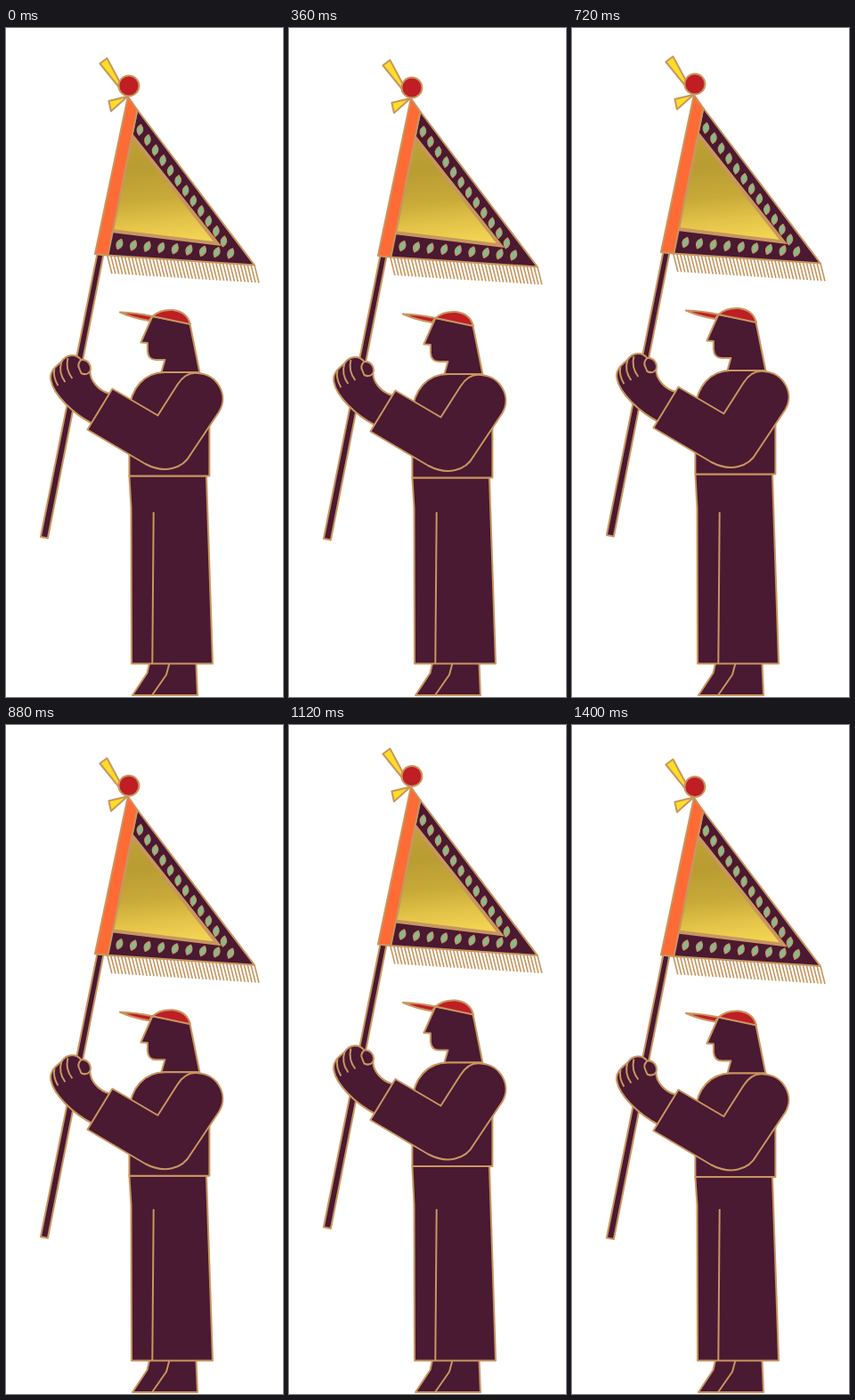
Write an HTML page that moves like this. It is 311 by 752 pixels and loops after 1440 ms.

```html
<!DOCTYPE html>
<html lang="en">
<head>
<meta charset="utf-8">
<title>Flag bearer</title>
<style>
  html, body { margin: 0; width: 100%; height: 100%; overflow: hidden; background: #fff; }
  svg { display: block; }
  .line { fill: none; }
  .leaf { fill: #80bd94; stroke-width: 1.3; }
</style>
</head>
<body>
<svg width="311" height="752" viewBox="0 0 311 752" fill="#4a1932" stroke="#c8965f" stroke-width="2" stroke-linejoin="round">
  <defs>
    <linearGradient id="gold" x1="0.2" y1="0" x2="0.3" y2="1">
      <stop offset="0" stop-color="#bfa236"/>
      <stop offset=".3" stop-color="#b99c32"/>
      <stop offset=".6" stop-color="#c8aa39"/>
      <stop offset=".82" stop-color="#e3c348"/>
      <stop offset="1" stop-color="#f2d453"/>
    </linearGradient>
    <path id="leaf" d="M0-6Q6.500 0 0 6Q-6.500 0 0-6Z"/>
  </defs>

  <path d="M161 714L158.500 725L142 750H215L213.500 714Z"/>
  <path class="line" d="M183.500 714L180 727L164 750"/>
  <path id="trousers"/>
  <path class="line" d="M165.700 545L164.300 714" stroke-linecap="round"/>

  <g id="upper">
    <path d="M102 254L109 255L46.500 573.500L38.500 572Z"/>

    <path d="M147 92L278.500 266.500L113 255.500Z"/>
    <path d="M141 121L237 242.500L118.500 228Z" fill="url(#gold)" stroke-width="4" stroke-linejoin="miter"/>
    <g id="leaves"></g>
    <path id="fringe" class="line" stroke-width="1.6"/>
    <path d="M136.500 77L147 92L114 255.500L99.500 254Z" fill="#ff6b35"/>

    <g fill="#ffde26">
      <path d="M105 40L113 34L128 62L126 66Z"/>
      <path d="M136 77L115 82L117.500 93.500Z"/>
    </g>
    <circle cx="137.500" cy="65" r="11.500" fill="#bf1e24"/>

    <path d="M164 324L151 353.500L158.500 354V363Q159 373 168 373H178L174 387H217L206 332Z"/>
    <g fill="#bf1e24">
      <path d="M127.500 319.500Q146 320 164 324L160 329Q142 326 127.500 319.500Z"/>
      <path d="M164 324Q173 316 187 317Q203 319 206.500 333Z"/>
    </g>

    <path d="M138 503.500V431C139 405 155 387 178 387H215L228 400V503.500Z"/>
    <path d="M97 445C74 433 53 412 50 396C48 386 55 381 62 375C67 367 78 365 84 373C92 372 96 380 94 386C94 397 104 408 116 411L112 442Z"/>
    <path class="line" d="M54 383Q52 392 58 402M62 375Q58 387 66 398M69 371Q66 384 74 394M84 373Q79 378 82 383L84 388Q90 391 94 386"/>
    <path d="M170 435.500L192 401C199 390 207 387 215 388C237 389 250 413 239 431L207 479C198 496 177 501 156 490L91 451.500L119 405.500Z"/>
  </g>
</svg>
<script>
const el = id => document.getElementById(id);
const STEP = 40, CYCLE = 480;

// Bob height in px: [step within the cycle, offset]
const bob = [[0, 0], [1, .5], [4, -7.5], [6, -2], [9, 2], [11, 4.5], [12, 0]];

function leafRow(count, x, y, dx, dy, angle) {
  let row = '';
  for (let i = 0; i < count; i++)
    row += `<use href="#leaf" class="leaf" transform="translate(${x + i * dx} ${y + i * dy}) rotate(${angle})"/>`;
  return row;
}

el('leaves').innerHTML =
  leafRow(12, 150, 114.5, 8.55, 11.4, 10) +
  leafRow(9, 127, 243, 15.6, 1.3, 22);

let fringe = '';
for (let i = 0; i <= 42; i++)
  fringe += `M${113.5 + i * 3.93} ${256 + i * .25}l5 20`;
el('fringe').setAttribute('d', fringe);

function offsetAt(step) {
  const i = bob.findIndex(([end]) => end > step);
  const [a, from] = bob[i - 1], [b, to] = bob[i];
  const p = (step - a) / (b - a);
  return from + (to - from) * p * p * (3 - 2 * p);
}

function draw(now) {
  // A small lead keeps step boundaries clear of timer rounding.
  const y = offsetAt(Math.floor((now + 4) % CYCLE / STEP));
  el('upper').setAttribute('transform', `translate(.4 ${y})`);
  el('trousers').setAttribute('d', `M138.400 ${503.5 + y}H225L232 714.400H141L140.500 540Z`);
  requestAnimationFrame(draw);
}
draw(0);
</script>
</body>
</html>
```
